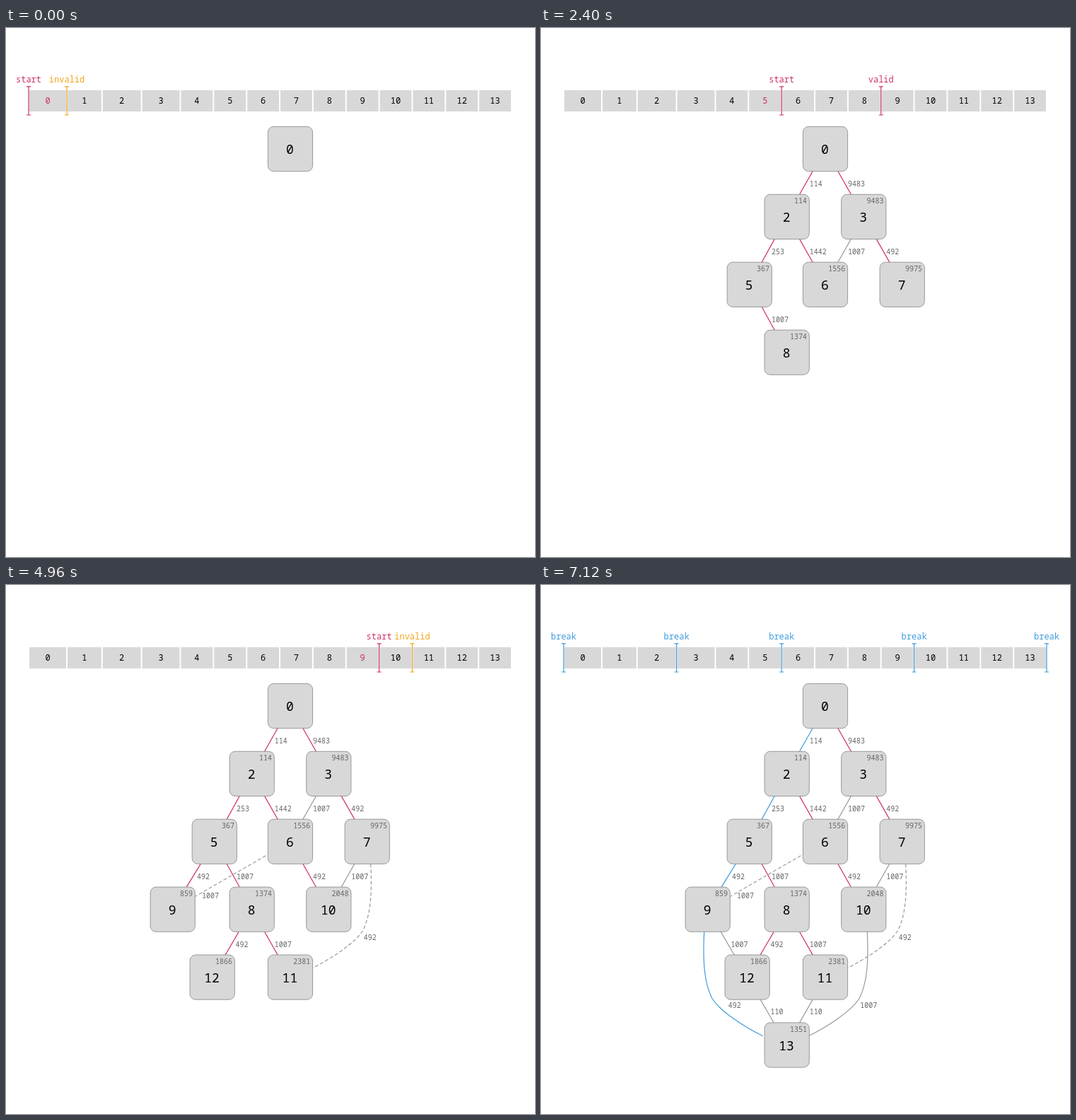
These frames come from a looping animation (748x748 px, 9.12 s). An HTML page:

```html
<!DOCTYPE html>
<html lang="en">
<head>
<meta charset="utf-8">
<title>Shortest path line breaking</title>
<style>
  html, body { margin: 0; width: 100%; height: 100%; overflow: hidden; background: #fff; }
  svg { display: block; width: 100%; height: 100%; }
  text { font-family: "Roboto Mono", "Noto Sans Mono", monospace; }
</style>
</head>
<body>
<svg id="stage" viewBox="0 0 748 748"></svg>
<script>
const RED = '#ce2e64', ORANGE = '#f0a41c', BLUE = '#3d9bdc', GRAY = '#999', BOX = '#d8d8d8';
const LOOP = 9120, TICK = 80, LAST_TICK = 89;
const TOP = 171, ROW_STEP = 95.9, SIZE = 63.2, HALF = SIZE / 2;
const ITEMS = 14, LAST = ITEMS - 1;

// Centre x of each node, row by row
const rows = [
  { 0: 402 }, { 2: 347.7, 3: 456.3 }, { 5: 294.8, 6: 402, 7: 510.7 },
  { 9: 235.7, 8: 347.7, 10: 456.3 }, { 12: 291.7, 11: 402 }, { 13: 347.7 }
];
const nodes = {};
rows.forEach((row, r) => {
  for (const id in row) nodes[id] = { x: row[id], y: TOP + r * ROW_STEP, row: r };
});

// Item i spans gapX(i)..gapX(i + 1); all but the first four are equally wide
const gapX = i => i < 4 ? [32, 86, 135.8, 191.6][i] : 246.5 + 46.85 * (i - 4);
// Node k is the break after item k, node 0 the one before everything
const gapOf = node => node && node + 1;

// Lines hold three or four items; only the last may be shorter
function lineCost(start, count) {
  const [three, four] = { 0: [114, 9483], 2: [253, 1442] }[start] || [1007, 492];
  return count < 3 ? 110 : count === 3 ? three : four;
}

function bestRoutes(edges) {
  const totals = { 0: 0 }, parents = {};
  for (const { from, to, cost } of edges) {
    const total = totals[from] + cost;
    if (total >= totals[to]) continue;
    totals[to] = total;
    parents[to] = from;
  }
  return { totals, parents };
}

function buildSteps() {
  const steps = [];
  let edges = [];
  for (const start of Object.keys(nodes).map(Number)) {
    const first = gapOf(start);
    for (let end = first; end <= Math.min(first + 4, LAST); end++) {
      const count = end - first + 1;
      const valid = count < 5 && (count > 2 || end === LAST);
      if (valid) edges = [...edges, { from: start, to: end, cost: lineCost(start, count) }];
      steps.push({ start, end, valid, edges, breaks: [] });
    }
  }
  steps.push({ start: LAST, edges, breaks: [] });

  const { parents } = bestRoutes(edges);
  const breaks = [];
  for (let node = LAST; node !== undefined; node = parents[node]) {
    breaks.push(node);
    steps.push({ edges, breaks: [...breaks] });
  }
  return steps;
}

const text = (value, x, y, size, color = '#000', anchor = 'middle') =>
  `<text x="${x}" y="${y + size * 0.36}" font-size="${size}" fill="${color}" text-anchor="${anchor}">${value}</text>`;

const stroke = (d, color, dashed) =>
  `<path d="${d}" fill="none" stroke="${color}" stroke-width="1.2"${dashed ? ' stroke-dasharray="5 3"' : ''}/>`;

const marker = (label, gap, color) => text(label, gapX(gap), 72.8, 12, color) +
  stroke(`M${gapX(gap) - 3} 82.8h6m-3 0V123m-3 0h6`, color);

function drawItem(i, active) {
  const left = gapX(i) + 1, width = gapX(i + 1) - gapX(i) - 2;
  return `<rect x="${left}" y="88" width="${width}" height="30" fill="${BOX}"/>` +
    text(i, left + width / 2, 102.8, 12, active ? RED : '#000');
}

function drawEdge({ from, to, cost }, color) {
  const a = nodes[from], b = nodes[to];
  const dx = b.x - a.x, dy = b.y - a.y, side = Math.sign(dx);
  const wide = Math.abs(dx) > 100;
  let d, labelX, labelY;
  if (b.row - a.row > 1) {
    // Bows outward around the row it skips
    const x = a.x - side * 5, y = a.y + HALF, s = side;
    d = `M${x} ${y}c${-2 * s} 42 0 72 ${11 * s} 94c${11 * s} 18 ${45 * s} 40 ${72 * s} 53.5`;
    labelX = x + 12 + 22 * s;
    labelY = y + 104;
  } else {
    const along = wide ? 0.78 : 0.5;
    d = `M${a.x} ${a.y}l${dx} ${dy}`;
    labelX = a.x + dx * along + 4.8;
    labelY = a.y + dy * along + 1.3;
  }
  return stroke(d, color, wide && to !== LAST) + text(cost, labelX, labelY, 10, '#666', 'start');
}

function drawNode(id, total) {
  const { x, y } = nodes[id];
  return `<rect x="${x - HALF}" y="${y - HALF}" width="${SIZE}" height="${SIZE}" rx="8" fill="${BOX}" stroke="${GRAY}"/>` +
    text(id, x - 0.6, y + 0.8, 18) +
    (total ? text(total, x + HALF - 3.4, y - HALF + 9, 10, '#666', 'end') : '');
}

function render({ start, end, valid, edges, breaks }) {
  const { totals, parents } = bestRoutes(edges);
  const edgeColor = ({ from, to }) =>
    parents[to] !== from ? GRAY : breaks.includes(from) && breaks.includes(to) ? BLUE : RED;

  let out = '';
  for (let i = 0; i < ITEMS; i++) out += drawItem(i, i === start);
  for (const edge of edges) out += drawEdge(edge, edgeColor(edge));
  for (const id in totals) out += drawNode(id, totals[id]);
  if (start !== undefined) out += marker('start', gapOf(start), RED);
  if (end !== undefined) out += marker(valid ? 'valid' : 'invalid', end + 1, valid ? RED : ORANGE);
  for (const node of breaks) out += marker('break', gapOf(node), BLUE);
  return out;
}

const steps = buildSteps();
const stage = document.getElementById('stage');
let shown = -1;
function frame() {
  // Seven steps per second, shown on an 80 ms grid
  const tick = Math.min(Math.floor(performance.now() % LOOP / TICK), LAST_TICK);
  const step = Math.floor((14 * tick + 12) / 25);
  if (step !== shown) stage.innerHTML = render(steps[shown = step]);
  requestAnimationFrame(frame);
}
frame();
</script>
</body>
</html>
```
